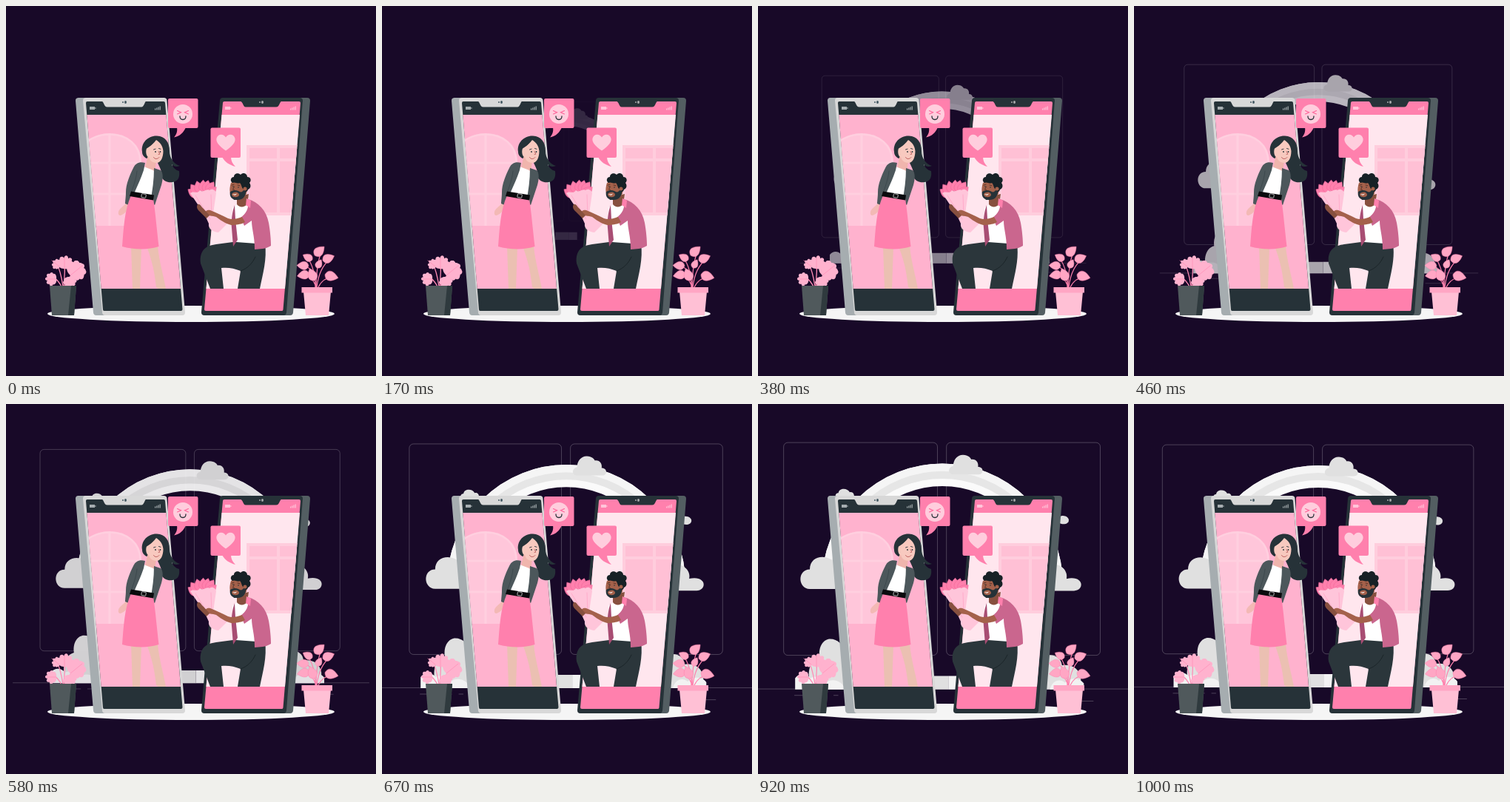
These frames come from a looping animation (500 px wide and 500 px high, 1.04 s). An HTML page:

```html
<!DOCTYPE html>
<html lang="en">
<head>
<meta charset="utf-8">
<title>Online date</title>
<style>
html, body { margin: 0; width: 100%; height: 100%; overflow: hidden; background: #180928; }
svg { display: block; width: 100vw; height: 100vh; }
.round { stroke-linejoin: round; stroke-linecap: round; }
.line { fill: none; stroke-linecap: round; }
</style>
</head>
<body>
<svg viewBox="0 0 500 500">
<defs>
  <clipPath id="leftScreen"><path d="M109.3 147H216.400L236 382H128.7Z"/></clipPath>
  <clipPath id="rightScreen"><path d="M291.5 147H397L377 382H270.5Z"/></clipPath>
  <path id="leaf" d="M0 0C-7-2-8-8 0-16C8-8 7-2 0 0Z"/>
  <path id="frond" d="M0 0C-5 1-10-2-9-6C-13-7-12-12-8-12C-9-17-4-18-2-15C-1-21 4-19 4-15C8-18 11-14 9-11C13-9 12-5 9-5C10-1 5 1 0 0Z"/>
  <g id="status">
    <path d="M0 1.5h7v4h-7zM7.4 2.6h1v1.8h-1z"/>
    <path d="M88 4h1.2v2H88zM90.2 3h1.2v3h-1.2zM92.4 2h1.2v4h-1.2zM94.6 1h1.2v5h-1.2z"/>
  </g>
</defs>

<g id="room" fill="none" stroke="#ebebeb" stroke-width=".25">
  <rect x="38.3" y="55.1" width="204.3" height="282.6" rx="5.6"/>
  <rect x="254.6" y="55.1" width="204.3" height="282.6" rx="5.6"/>
  <path d="M0 382.4H500M52.5 390.9H95.6M104.6 390.9h6.3M416.8 398.5h33.1"/>
</g>

<g id="sky">
  <g fill="none">
    <path d="M104 243a145 145 0 0 1 290 0" stroke="#fafafa" stroke-width="30"/>
    <path d="M94 243a155 155 0 0 1 310 0" stroke="#f5f5f5" stroke-width="10"/>
    <path d="M104 243a145 145 0 0 1 290 0" stroke="#e6e6e6" stroke-width="10"/>
  </g>
  <g fill="#e0e0e0">
    <path d="M264 97.5c-8 0-8-10-.5-11c0-8 5-15 13-15c7 0 10 4 11 6c6-1 10 4 9 10c8 0 8 10 1 10Z"/>
    <path d="M107 127c0-4 2-5 4-5c1-7 12-7 15-1c4-1 6 2 6 6Z"/>
    <path d="M73 249.500c-16 0-17-26 0-26c0-19 24-21 34-8v34Z"/>
    <path d="M396 217c14 0 20 11 18 19c24-5 24 16 10 16h-28Z"/>
    <path d="M404 154c6-4 13 0 13 4c0 7-10 6-13 4Z"/>
    <path d="M86 340c-2-15 6-24 14-24c10 0 18 8 18 18v49H76c-8-18-5-39 10-43Z"/>
    <path d="M386 338c12-3 21 3 22 13c14-2 23 5 25 17v15h-47Z"/>
    <path d="M225 365h32v18h-32Z"/>
  </g>
  <path d="M53.500 383V368c6-8 16-6 20 0c10-5 18-1 22 5c8-5 20-2 25 10ZM257 365h20v18h-20ZM392 383c3-12 13-15 20-9c8-8 20-6 25 1v8Z" fill="#f2f2f2"/>
</g>

<ellipse cx="250" cy="416" rx="194" ry="11" fill="#f5f5f5"/>

<!-- left phone -->
<g class="round">
  <path d="M98 128H205L230 414H122Z" fill="#a6adb0" stroke="#a6adb0" stroke-width="8"/>
  <path d="M108 128H213.500L238 414H134Z" fill="#d8d8d8" stroke="#d8d8d8" stroke-width="8"/>
  <path d="M110 131H213L236.500 410H133Z" fill="#263238" stroke="#263238" stroke-width="4"/>
</g>
<g clip-path="url(#leftScreen)">
  <path d="M100 140H240V390H100Z" fill="#ffb2ce"/>
  <path d="M100 297V195C107 181 123 172 140 172C164 172 183 188 183 211V297Z" fill="#ffc6da"/>
  <path d="M140 172V297M100 212H183M100 254H183" fill="none" stroke="#ffcfdf" stroke-width="3"/>
  <path d="M100 195C107 181 123 173.500 140 173.500C164 173.500 181.500 188 181.500 211V297" fill="none" stroke="#ffcfdf" stroke-width="2.500"/>
</g>
<path d="M129 128H190C187 129 187 136.500 183 136.500H137C132 136.500 133 130 129 128Z" fill="#d8d8d8"/>
<g fill="#455a64"><circle cx="158" cy="130" r="1"/><ellipse cx="161.500" cy="130" rx="1.500" ry="2"/></g>
<use href="#status" x="113" y="134.500" fill="#a6adb0"/>

<!-- right phone -->
<g class="round">
  <path d="M300 128H407L384 414H275Z" fill="#535e62" stroke="#535e62" stroke-width="8"/>
  <path d="M293 128H397L375 414H268Z" fill="#263238" stroke="#263238" stroke-width="8"/>
  <path d="M295 131H396L372.500 410H270Z" fill="#ff80ad" stroke="#ff80ad" stroke-width="4"/>
</g>
<g clip-path="url(#rightScreen)">
  <path d="M260 140H400V390H260Z" fill="#ffe6ee"/>
  <path d="M325 188H400V283H325Z" fill="#ffcddd"/>
  <path d="M329 192H366V206H329ZM370 192H400V206H370ZM329 210H366V279H329ZM370 210H400V279H370Z" fill="#ffc0d5"/>
</g>
<path d="M316 128H373C369 130 370 136.500 365 136.500H324C320 136.500 321 130 316 128Z" fill="#263238"/>
<g fill="#a6a8aa"><circle cx="343" cy="130" r="1"/><ellipse cx="346.500" cy="130" rx="1.500" ry="2"/></g>
<use href="#status" x="296" y="134.500" fill="#ffc5da"/>

<!-- speech bubbles -->
<g fill="#ff80ad">
  <rect x="219" y="125" width="40.500" height="40" rx="2"/>
  <path d="M231 164C232 170 230 174 227 177.500C235 176 240 171 243 164Z"/>
  <rect x="276.500" y="164.500" width="40.500" height="40.500" rx="2"/>
  <path d="M292 204C296 211 302 215 310 217C306 213 304 209 304 204Z"/>
</g>
<circle cx="239" cy="146" r="13" fill="#ffcddd"/>
<path class="line" d="M231.500 141.500l5 2.200l-5 2.200M246.500 141.500l-5 2.200l5 2.200" stroke="#ff6199" stroke-width="1.100"/>
<path class="line" d="M235 149C235 155 243 155 243 149" stroke="#263238" stroke-width="1.300"/>
<path d="M297 195.500C288 189 283.500 184 284.500 179C286 172.500 294 172 297 177.500C300 172 308 172.500 309.500 179C310.500 184 306 189 297 195.500Z" fill="#ffcddd"/>

<!-- woman -->
<g>
  <path d="M169 325L171 382H181L183 325ZM190 325C198 345 201 362 203 380L206 382H216C213 365 207 345 205 325Z" fill="#ebc0b2"/>
  <path d="M163 266C158 271 153 274 152 278C151 283 154 284 157 282C162 280 165 274 169 268Z" fill="#f3b9b5"/>
  <path d="M184 197C182 185 192 175 204 175.500C215 176 221 184 221 196C221 205 226 213 235 216C230 218 227 217 224 214C226 219 230 222 234 223C235 231 233 237 225 238C219 239 213 237 210 231C212 225 208 219 205 212L200 200L190 206C185 203 184 200 184 197Z" fill="#263238"/>
  <path d="M192 201L188 219L201 225L203 210Z" fill="#f0b5ad"/>
  <path d="M186 217L199 222L203 226L200 258L170 253L178 220Z" fill="#fff"/>
  <path d="M191 191C196 189 200 185 203 181C208 184 212 189 212.500 196C212.500 205 209 212 203.500 212C197 212 194 208 193 204C189 204 188 194 191 191Z" fill="#f8c9bf"/>
  <path d="M189 193C197 189 200 184 202 180C208 180 213 188 213 196C218 189 214 178 205 177C195 176 187 184 189 193Z" fill="#263238"/>
  <path class="line" d="M199.500 204.500C201 207.500 205 207 207 204.500M206 196.500L208 200L206 200.500" stroke="#b95b5b" stroke-width=".9"/>
  <path class="line" d="M199.500 194l2.500-.8M206.500 192.500l2.500 .8" stroke="#263238" stroke-width=".9"/>
  <circle cx="202" cy="197" r=".9" fill="#263238"/><circle cx="208.500" cy="197" r=".9" fill="#263238"/>
  <path d="M188 212C181 210 175 212 172 219C167 229 162 241 162 252C162 258 161 263 161 267L168 270C170 256 179 243 186 222Z" fill="#4c575b"/>
  <path d="M200 219L209 222C213 226 212 235 210 242L201 269L195 264C198 249 200 235 200 219Z" fill="#4c575b"/>
  <path class="line" d="M177 223C176 235 171 246 168 256" stroke="#39464b" stroke-width=".8"/>
  <path d="M169 256L199 260C202 280 204 304 206.500 325C192 330 171 329 157 325C159 300 160 276 169 256Z" fill="#ff80ad"/>
  <path d="M169 250.500L200 255.500L199 262.500L167 257Z" fill="#0a0a0d"/>
  <rect x="183" y="254" width="6" height="5" rx="1" fill="none" stroke="#d8d8d8" stroke-width=".8" transform="rotate(9 186 257)"/>
</g>

<!-- bouquet -->
<g>
  <g fill="#ff80ad" stroke="#e85f92" stroke-width=".4">
    <use href="#leaf" transform="translate(259 257)rotate(-55)"/>
    <use href="#leaf" transform="translate(259 254)rotate(-35)"/>
    <use href="#leaf" transform="translate(262 252)rotate(-15)"/>
    <use href="#leaf" transform="translate(266 251)rotate(2)"/>
    <use href="#leaf" transform="translate(269 251)rotate(16)"/>
    <use href="#leaf" transform="translate(272 251)rotate(34)"/>
    <use href="#leaf" transform="translate(272 255)rotate(50)"/>
  </g>
  <path d="M249 253C254 249 258 255 262 249C267 253 271 246 275 249C279 246 283 249 284 253L280 280L301 292L287 306C278 305 273 300 274 294L269 283Z" fill="#ffc5da"/>
  <path class="line" d="M256 256L276 288M277 255L278 284" stroke="#ffa9c9" stroke-width=".9"/>
</g>

<!-- man -->
<g>
  <path d="M314 318L350 321C353 342 347 362 343 382H313L317 358C308 354 299 353 291 354L294 382H276L263 348C261 330 270 324 284 322Z" fill="#2b363b"/>
  <path class="line" d="M317 358C326 355 333 348 337 339" stroke="#1b2529" stroke-width="1"/>
  <path d="M306 273C311 267 317 266 328 266L338 321L311 319Z" fill="#fff"/>
  <path d="M312 258L328 254L326 268C321 273 315 272 312 268Z" fill="#87503f"/>
  <path d="M309 269C306 277 304 290 305 300L307 325L313 316L310 288Z" fill="#a84d73"/>
  <path d="M327 261C341 265 352 276 355 293C357 304 358 316 358 324C350 329 344 328 336 329C336 310 332 302 332 290L322 297L317 286C324 281 329 274 327 261Z" fill="#ca668e"/>
  <path d="M325 260L331 263L330 273L324 269Z" fill="#ff80ad"/>
  <path d="M319 285C311 288 305 289 300 287C292 283 284 279 276 276C271 275 269 278 268 281C273 284 279 283 284 285C293 292 302 297 309 296C316 295 320 294 323 292Z" fill="#a4614b"/>
  <path d="M259 268C257 271 258 275 262 278L271 287L275 283L267 274C264 272 263 267 259 268Z" fill="#87503f"/>
  <path d="M304 239C310 235 321 236 326 240L325 253C322 262 314 263 308 260C302 257 301 248 304 239Z" fill="#a4614b"/>
  <path d="M303 251C306 249 310 248 314 250C317 252 319 252 321 249L324 245C326 257 320 263 311 262C303 261 302 255 303 251Z" fill="#263238"/>
  <path d="M305 254C308 251 312 251 314 253C317 256 313 259 309 258C306 258 305 256 305 254Z" fill="#a4614b"/>
  <path d="M306 254q3 1 6-.5q-2 4-6 .5Z" fill="#fff"/>
  <path d="M307 260q3-2 6 0l-1 2h-4Z" fill="#263238"/>
  <path d="M306 239C302 236 304 231 308 231C308 226 314 225 317 228C321 224 326 227 326 231C331 231 332 236 329 239C332 243 330 247 327 248C326 252 323 252 322 248C318 247 319 242 316 239C313 241 309 237 306 239Z" fill="#172126"/>
  <circle cx="323" cy="247" r="2.500" fill="#a4614b"/>
  <path class="line" d="M305 242l3-.7M313 242l3 .8M308.500 244l-2 4l2 .5" stroke="#4d291f" stroke-width=".8"/>
  <circle cx="307" cy="244" r=".8" fill="#263238"/><circle cx="314" cy="245" r=".8" fill="#263238"/>
</g>

<!-- left plant -->
<path class="line" d="M77 379C75 365 73 356 67 344M78 379C79 363 81 352 78 342M79 379C83 367 91 362 99 355M75 379C70 370 65 365 58 369" stroke="#ff8db6" stroke-width="1.300"/>
<g fill="#ffb2ce">
  <use href="#frond" transform="translate(73 352)rotate(-55)scale(.65)"/>
  <use href="#frond" transform="translate(79 355)rotate(5)scale(.95)"/>
  <use href="#frond" transform="translate(87 364)rotate(48)scale(1.250)"/>
  <use href="#frond" transform="translate(86 359)rotate(80)scale(1.150)"/>
  <use href="#frond" transform="translate(68 369)rotate(-92)scale(.8)"/>
  <use href="#frond" transform="translate(85 366)rotate(168)scale(.8)"/>
</g>
<path class="line" d="M79 355V340M87 364L103 351M72 352L62 344M68 369H55" stroke="#ff8db6" stroke-width=".7"/>
<path d="M59 378H95L92 418H62Z" fill="#50595c"/>
<path d="M88 378H95L92 418H84Z" fill="#2f3a3e"/>

<!-- right plant -->
<path class="line" d="M419 380C419 363 421 347 426 331M418 380C418 362 414 349 407 340M420 380C422 362 428 350 438 342M419 380C416 372 413 366 405 364M422 380C426 372 432 367 441 367M417 366C411 353 406 351 400 351" stroke="#ff80ad" stroke-width="1.200"/>
<g fill="#ffa6c4" stroke="#ff80ad" stroke-width=".4">
  <use href="#leaf" transform="translate(417 337)rotate(48)scale(1.100)"/>
  <use href="#leaf" transform="translate(414 343)rotate(-62)scale(.9)"/>
  <use href="#leaf" transform="translate(428 344)rotate(68)scale(1.050)"/>
  <use href="#leaf" transform="translate(409 351)rotate(-88)"/>
  <use href="#leaf" transform="translate(420 354)rotate(28)scale(.8)"/>
  <use href="#leaf" transform="translate(410 362)rotate(-100)scale(1.050)"/>
  <use href="#leaf" transform="translate(417 371)rotate(-22)scale(1.100)"/>
  <use href="#leaf" transform="translate(431 363)rotate(104)scale(1.150)"/>
</g>
<path d="M402 386H439L436 418H405Z" fill="#ffc0d5"/>
<path d="M399.500 380H441V387.500H399.500Z" fill="#ffa6c4"/>
</svg>
<script>
const LOOP = 1040, FRAME = 1000 / 24;
const layers = [["room", 250, 228], ["sky", 246, 227]]
  .map(([id, x, y]) => ({ el: document.getElementById(id), x, y }));

const bezier = (a, b, u) => 3 * a * (1 - u) ** 2 * u + 3 * b * (1 - u) * u * u + u ** 3;

// cubic-bezier(.36, -.01, .5, 1.38), overshoots before settling
function ease(x) {
  let lo = 0, hi = 1;
  for (let i = 0; i < 30; i++) {
    const mid = (lo + hi) / 2;
    if (bezier(.36, .5, mid) < x) lo = mid; else hi = mid;
  }
  return bezier(-.01, 1.38, hi);
}

function draw(now) {
  // the motion advances in steps of 1/24 s
  const step = Math.floor((now % LOOP + 6) / FRAME);
  const p = step ? ease(Math.min(1, step / 24 + .03)) : 0;
  const scale = .5 + p / 2;
  for (const { el, x, y } of layers) {
    el.setAttribute("transform", `translate(${x} ${y})scale(${scale})translate(${-x} ${-y})`);
    el.setAttribute("opacity", Math.max(0, Math.min(1, p)));
  }
}

const start = performance.now();
function tick() {
  draw(performance.now() - start);
  requestAnimationFrame(tick);
}
tick();
</script>
</body>
</html>
```
